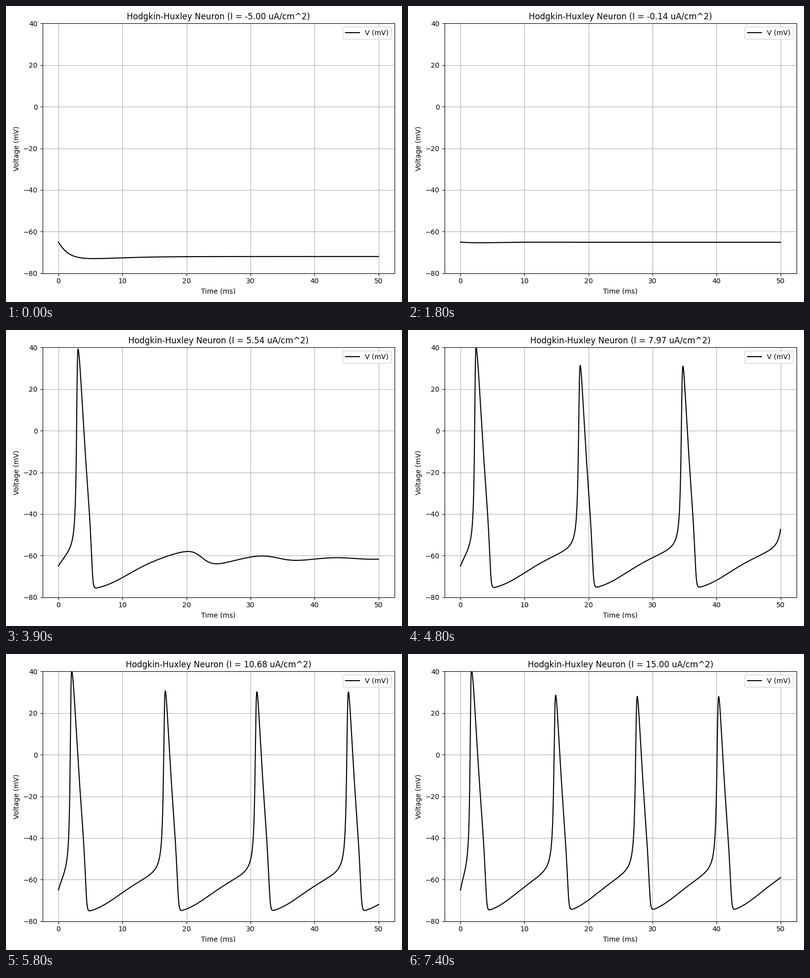
A matplotlib script that plays this animation: 800 by 600 pixels, repeating every 7500 ms.

```python
import numpy as np
import matplotlib.pyplot as plt
from matplotlib.animation import FuncAnimation

C_M = 1.0
G_NA, G_K, G_L = 120.0, 36.0, 0.3
E_NA, E_K, E_L = 50.0, -77.0, -54.387

FRAMES, INTERVAL = 75, 100
DT, T_END = 0.01, 50.0
HEIGHT, TOP_MARGIN = 600, 35.33  # pixels

currents = np.linspace(-5, 15, FRAMES)
t = np.arange(0, T_END, DT)


def gate(x, alpha, beta):
    return alpha * (1 - x) - beta * x


def derivatives(state):
    v, m, h, n = state
    i_na = G_NA * m**3 * h * (v - E_NA)
    i_k = G_K * n**4 * (v - E_K)
    i_l = G_L * (v - E_L)
    return np.array([
        (currents - i_na - i_k - i_l) / C_M,
        gate(m, 0.1 * (v + 40) / (1 - np.exp(-(v + 40) / 10)),
             4 * np.exp(-(v + 65) / 18)),
        gate(h, 0.07 * np.exp(-(v + 65) / 20),
             1 / (1 + np.exp(-(v + 35) / 10))),
        gate(n, 0.01 * (v + 55) / (1 - np.exp(-(v + 55) / 10)),
             0.125 * np.exp(-(v + 65) / 80)),
    ])


def simulate():
    """Integrate all currents at once with RK4; returns V[time, current]."""
    state = np.array([-65.0, 0.05, 0.6, 0.32])[:, None] * np.ones(FRAMES)
    volts = np.empty((len(t), FRAMES))
    for i in range(len(t)):
        volts[i] = state[0]
        k1 = derivatives(state)
        k2 = derivatives(state + DT / 2 * k1)
        k3 = derivatives(state + DT / 2 * k2)
        k4 = derivatives(state + DT * k3)
        state = state + DT / 6 * (k1 + 2 * k2 + 2 * k3 + k4)
    return volts


volts = simulate()

plt.rcParams["font.family"] = "DejaVu Sans"
fig, ax = plt.subplots(figsize=(8, HEIGHT / 100), dpi=100)
line, = ax.plot(t, volts[:, 0], color="black", label="V (mV)")
ax.set_xlim(-2.5, 52.5)
ax.set_ylim(-80, 40)
ax.set_xlabel("Time (ms)")
ax.set_ylabel("Voltage (mV)")
ax.grid(True)
ax.legend(loc="upper right")


def update(frame):
    line.set_ydata(volts[:, frame])
    ax.set_title(f"Hodgkin-Huxley Neuron (I = {currents[frame]:.2f} uA/cm^2)")
    return line,


update(0)
fig.tight_layout()
fig.subplots_adjust(top=1 - TOP_MARGIN / HEIGHT)
anim = FuncAnimation(fig, update, frames=FRAMES, interval=INTERVAL, repeat=True)
plt.show()
```
